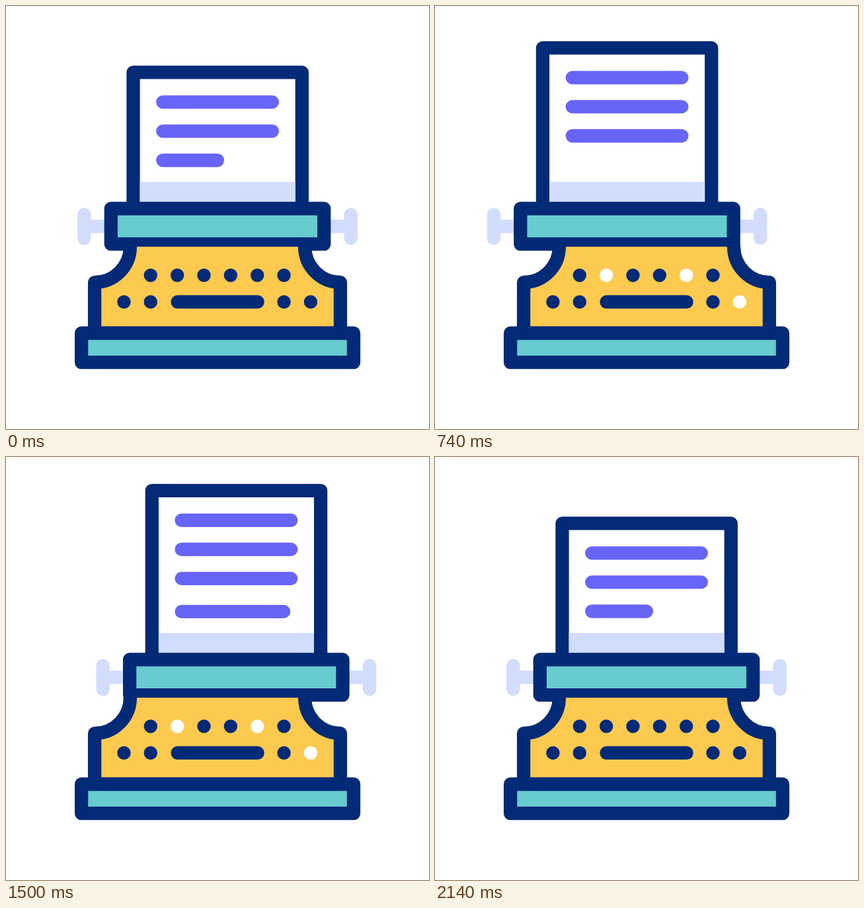
These frames come from a looping animation (640x640 px, 2400 ms). An HTML page:

```html
<!DOCTYPE html>
<html lang="en">
<head>
<meta charset="utf-8">
<title>Typewriter</title>
<style>
html, body { margin: 0; height: 100%; overflow: hidden; background: #fff; }
svg { display: block; width: 100vw; height: 100vh; }
.ink { stroke: #032a76; stroke-width: 20.3; stroke-linejoin: round; stroke-linecap: round; }
.text { stroke: #6864f8; stroke-width: 20.4; stroke-linecap: round; }
.knob { stroke: #d2dcfd; stroke-width: 20.4; stroke-linecap: round; fill: none; }
</style>
</head>
<body>
<svg viewBox="0 0 640 640">
  <g id="carriage">
    <g id="paper">
      <path class="ink" fill="#fff" d="M192.5 370V100.4H447.8V370"/>
      <path class="text" d="M237.3 145.4H402.8M237.3 189.4H402.8"/>
      <path class="text" id="third"/>
    </g>
    <path fill="#d2dcfd" d="M202.6 266.3H437.7V310H202.6Z"/>
    <path class="text" id="fourth"/>
    <path class="knob" d="M118.3 315.6V351.2M118.3 333.4H150M521.7 315.6V351.2M521.7 333.4H490"/>
    <!-- hides the paper's lower end -->
    <path class="ink" fill="#67cbd0" d="M158.8 306.5H481.2V360.2H158.8Z"/>
  </g>
  <path class="ink" fill="#fdca50" d="M187.9 364.3A53.8 53.8 0 0 1 134.1 418.1V495H505.9V418.1A53.8 53.8 0 0 1 452.1 364.3"/>
  <path class="ink" fill="#67cbd0" d="M114.1 495H526V539.2H114.1Z"/>
  <path class="ink" d="M259.6 447.7H380.6"/>
  <g id="keys"></g>
</svg>
<script>
const LOOP = 2400, NAVY = '#032a76';
const get = id => document.getElementById(id);
const [carriage, paper, third, fourth, keyBox] =
  ['carriage', 'paper', 'third', 'fourth', 'keys'].map(get);

// Upper row 0-5, lower row 6-9
const keys = [0, 1, 2, 3, 4, 5, -1, 0, 5, 6].map((col, i) => {
  const key = document.createElementNS('http://www.w3.org/2000/svg', 'circle');
  key.setAttribute('cx', 218.8 + col * 40.35);
  key.setAttribute('cy', i < 6 ? 407.5 : 447.7);
  key.setAttribute('r', 10.2);
  return keyBox.appendChild(key);
});
const presses = [
  { from: 240, to: 660, keys: [0, 2, 7] },
  { from: 660, to: 1900, keys: [1, 4, 9] }
];

// Eased value through [time, value] stops
function track(t, stops) {
  const i = stops.findIndex(s => s[0] > t);
  if (i < 0) return stops[stops.length - 1][1];
  if (i === 0) return stops[0][1];
  const [t0, a] = stops[i - 1], [t1, b] = stops[i];
  const u = (t - t0) / (t1 - t0);
  return a + (b - a) * u * u * (3 - 2 * u);
}

const move = (el, x, y) => el.setAttribute('transform', `translate(${x} ${y})`);

function setLine(el, y, length) {
  el.setAttribute('d', length > 0.5 ? `M237.3 ${y}h${length}` : '');
}

function draw(now) {
  const t = now % LOOP;
  move(carriage, track(t, [[0, 0], [960, -34], [995, -34], [1435, 28.3], [1740, 28.3], [2140, 0]]), 0);
  move(paper, 0, track(t, [[20, 0], [670, -37], [1340, -37], [1660, -62], [2140, 0]]));
  setLine(third, 233.5, track(t, [[20, 82.5], [670, 165.5], [1640, 165.5], [2140, 82.5]]));
  setLine(fourth, track(t, [[1200, 251.5], [1660, 227.2], [2140, 251.5]]),
    track(t, [[1058, 0], [1584, 165.5], [1640, 165.5], [2140, 0]]));
  const press = presses.find(p => t >= p.from && t < p.to);
  keys.forEach((key, i) =>
    key.setAttribute('fill', press && press.keys.includes(i) ? '#fff' : NAVY));
}

const start = performance.now();
function tick() {
  draw(performance.now() - start);
  requestAnimationFrame(tick);
}
tick();
</script>
</body>
</html>
```
